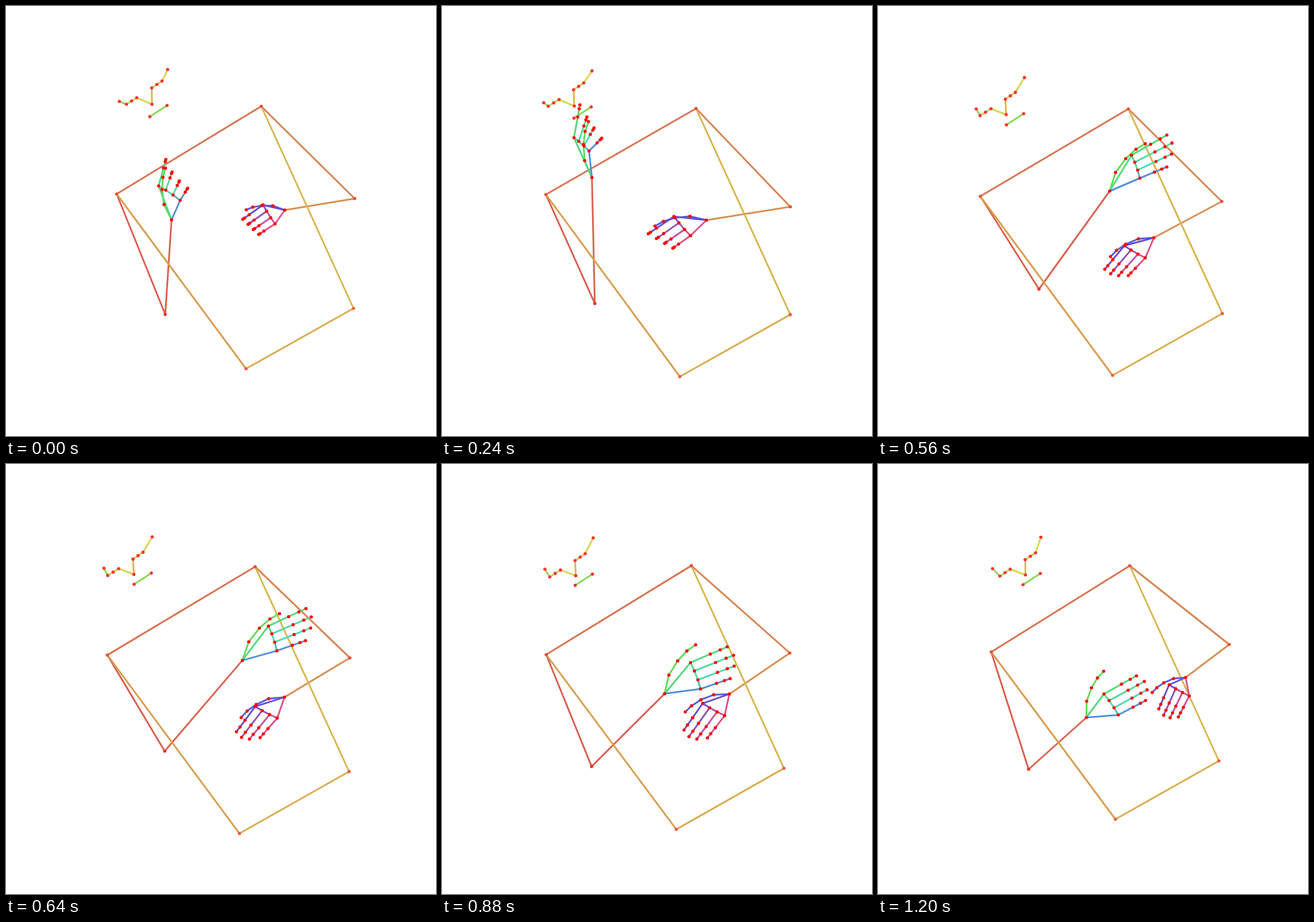
Write an HTML page with a canvas that moves like this. It is 748 by 748 pixels and loops after 1280 ms.

```html
<!DOCTYPE html>
<html lang="en">
<head>
<meta charset="utf-8">
<title>Signing skeleton</title>
<style>
  html, body { margin: 0; width: 100%; height: 100%; overflow: hidden; background: #fff; }
  canvas { display: block; }
</style>
</head>
<body>
<canvas id="stage" width="748" height="748"></canvas>
<script>
const ctx = document.getElementById('stage').getContext('2d');
const LOOP = 1280, STEP = 80;
const keys = [];

// body: nose, then left and right shoulder, elbow, wrist, hip
// hands: index and little knuckle, then thumb, index and little fingertip
function pose(time, body, left, right) {
  keys.push({ time, xy: [...body, ...left, ...right] });
}

pose(0,
  [254,171, 192.5,327, 444,174.5, 277,536.5, 606.5,335, 288,372, 485,355, 417.5,631, 604.5,526],
  [265.5,313, 303,338, 277.5,282, 278,267, 316,317],
  [447,346, 468,379, 418,354.5, 412,371, 439.5,397.5]);
pose(160,
  [237,171, 183.5,328, 443,177, 268,527.5, 606.5,346, 249.5,315, 463.5,363.5, 415,642.5, 606.5,535],
  [210.5,248.5, 242.5,269, 228.5,218.5, 211.5,192.5, 258,249],
  [411.5,354, 438.5,389, 379,368.5, 370,382, 408.5,409.5]);
pose(400,
  [221.5,183, 178,328, 439,180, 267.5,496, 603,350, 324.5,291.5, 465,393, 411,644.5, 602.5,537],
  [328,220, 342.5,253, 365,197, 371,169, 381.5,227],
  [405.5,397, 437,424, 374.5,416, 359,432, 405.5,449.5]);
pose(560,
  [223,189, 178,331, 435.5,179, 280,492.5, 598,340, 403,322, 480,403, 408,642.5, 599,535],
  [441,259.5, 455.5,299.5, 465,239.5, 502.5,224.5, 502.5,280],
  [428.5,417, 465,438, 404.5,436, 394.5,458, 435.5,469]);
pose(800,
  [224,196, 175,333.5, 430.5,178, 260.5,520.5, 602,333, 392.5,383, 492,405, 404,641.5, 593.5,534],
  [439,327, 455,373.5, 451.5,298.5, 504.5,300, 507.5,357],
  [441,422, 481,442.5, 412,440, 407,469.5, 450,481.5]);
pose(1040,
  [253,189.5, 196.5,326.5, 441.5,175, 264,532, 611,319.5, 375,426, 518.5,385.5, 416,621.5, 598,518.5],
  [413,376.5, 434.5,418, 415.5,341, 471.5,346, 482,395.5],
  [484,399, 517.5,421.5, 452.5,408, 457,441, 492,458]);
pose(1200,
  [256.5,193, 197,327, 438,177, 262,531, 611,314, 362.5,441, 535,371.5, 413,618, 593,516.5],
  [393,400, 418,436.5, 392.5,360.5, 449.5,368.5, 465.5,411.5],
  [506.5,384, 541.5,403.5, 477,397.5, 488.5,426, 522.5,440]);

// Slope at key k for coordinate i, weighted by the neighbouring spans
function slope(k, i) {
  const rate = a => (keys[a + 1].xy[i] - keys[a].xy[i]) / (keys[a + 1].time - keys[a].time);
  if (k === 0) return rate(0);
  if (k === keys.length - 1) return rate(k - 1);
  const before = keys[k].time - keys[k - 1].time, after = keys[k + 1].time - keys[k].time;
  return (rate(k - 1) * after + rate(k) * before) / (before + after);
}

// Smooth cubic path through the key poses, as a list of [x, y]
function pointsAt(time) {
  let k = 0;
  while (k < keys.length - 2 && time >= keys[k + 1].time) k++;
  const a = keys[k], b = keys[k + 1], span = b.time - a.time;
  const u = (time - a.time) / span, v = 1 - u;
  const xy = a.xy.map((p, i) =>
    p * v * v * (1 + 2 * u) + b.xy[i] * u * u * (3 - 2 * u) +
    span * u * v * (v * slope(k, i) - u * slope(k + 1, i)));
  const points = [];
  for (let i = 0; i < xy.length; i += 2) points.push([xy[i], xy[i + 1]]);
  return points;
}

const lerp = (a, b, u) => [a[0] + (b[0] - a[0]) * u, a[1] + (b[1] - a[1]) * u];
const clamp = u => Math.min(1, Math.max(0, u));
const hue = h => `hsl(${h}, 64%, 58%)`;
let dots;

function line(color, ...points) {
  ctx.strokeStyle = color;
  ctx.beginPath();
  for (const p of points) ctx.lineTo(...p);
  ctx.stroke();
}

function mark(color, ...points) {
  for (const p of points) dots.push({ p, color });
}

function body([ls, rs, le, re, lw, rw, lh, rh]) {
  line(hue(7), ls, le);
  line(hue(8), le, lw);
  line(hue(15), ls, rs);
  line(hue(22), rs, re);
  line(hue(28), re, rw);
  line(hue(34), ls, lh);
  line(hue(40), lh, rh);
  line(hue(45), rs, rh);
  mark('#ec4f38', ls, rs, re);
  mark('#f0302a', le);
  mark('#ec5d3b', lh, rh);
}

// Offsets from the nose; the head turns as it moves sideways and nods as it sinks
function face(nose) {
  const turn = (255 - nose[0]) / 33, nod = (nose[1] - 171) / 22;
  const at = (x, y, dx, dy) => [nose[0] + x + dx * turn, nose[1] + y + dy * nod];
  const ear = at(-57, -5, 5, -6), ear2 = at(27, -60.5, 5, -5);
  const inner = at(-26.5, -11.5, 0, 1.5), outer = at(-44.5, 0, -1, 2);
  const inner2 = at(-0.5, -28.5, -1, 2), outer2 = at(17.5, -40.5, -1.5, 2);
  const mouth = [at(-4, 21.5, 4.5, -4.5), at(26, 2, 4.5, -4.5)];
  line(hue(59), nose, inner);
  line(hue(72), inner, outer);
  line(hue(95), outer, ear);
  line(hue(46), nose, inner2);
  line(hue(51), inner2, outer2);
  line(hue(58), outer2, ear2);
  line(hue(96), ...mouth);
  mark('#f7342c', nose, ear, ear2, inner, outer, inner2, outer2, ...mouth,
    lerp(inner, outer, 0.5), lerp(inner2, outer2, 0.5));
}

// Joints of the thumb along and beside the line from wrist to tip
const THUMB = [[0.31, 0.11], [0.6, 0.113], [0.83, 0.07], [1, 0]];

function hand(wrist, [index, little, thumbTip, indexTip, littleTip], side, curl, droop, colors) {
  const dx = thumbTip[0] - wrist[0], dy = thumbTip[1] - wrist[1];
  const thumb = THUMB.map(([a, b]) =>
    [wrist[0] + a * dx + side * b * dy, wrist[1] + a * dy - side * b * dx]);
  const fingers = [0, 1, 2, 3].map(n => {
    const middle = n === 1 || n === 2;
    const base = lerp(wrist, lerp(index, little, n / 3), middle ? 1.02 : 1);
    const tip = lerp(base, lerp(indexTip, littleTip, n / 3), middle ? 1.16 - droop * curl : 1);
    return [0, 0.54 + 0.14 * curl, 0.81 + 0.11 * curl, 1].map(u => lerp(base, tip, u));
  });
  line(colors[0], wrist, ...thumb);
  line(colors[1], wrist, index);
  line(colors[4], wrist, little);
  fingers.forEach((finger, n) => {
    line(colors[n + 1], ...finger);
    if (n) line(`color-mix(in srgb, ${colors[n]}, ${colors[n + 1]})`, fingers[n - 1][0], finger[0]);
  });
  mark('#ff0000', wrist, ...thumb, ...fingers.flat());
}

function draw(time) {
  const points = pointsAt(time);
  dots = [];
  ctx.clearRect(0, 0, 748, 748);
  ctx.lineWidth = 3;
  body(points.slice(1, 9));
  face(points[0]);
  hand(points[5], points.slice(9, 14), 1, clamp((400 - time) / 240), 0.3,
    ['#62da57', '#50da78', '#50daa2', '#4fdab2', '#4f8fdc']);
  hand(points[6], points.slice(14), -1, clamp((640 - time) / 240), 0.16,
    ['#565cd8', '#6250d2', '#9050b8', '#c350a0', '#de508a']);
  for (const { p, color } of dots) {
    ctx.fillStyle = color;
    ctx.beginPath();
    ctx.arc(...p, 2.8, 0, Math.PI * 2);
    ctx.fill();
  }
}

function tick() {
  const time = performance.now() % LOOP;
  draw(Math.floor(time / STEP) * STEP);
  requestAnimationFrame(tick);
}
tick();
</script>
</body>
</html>
```
